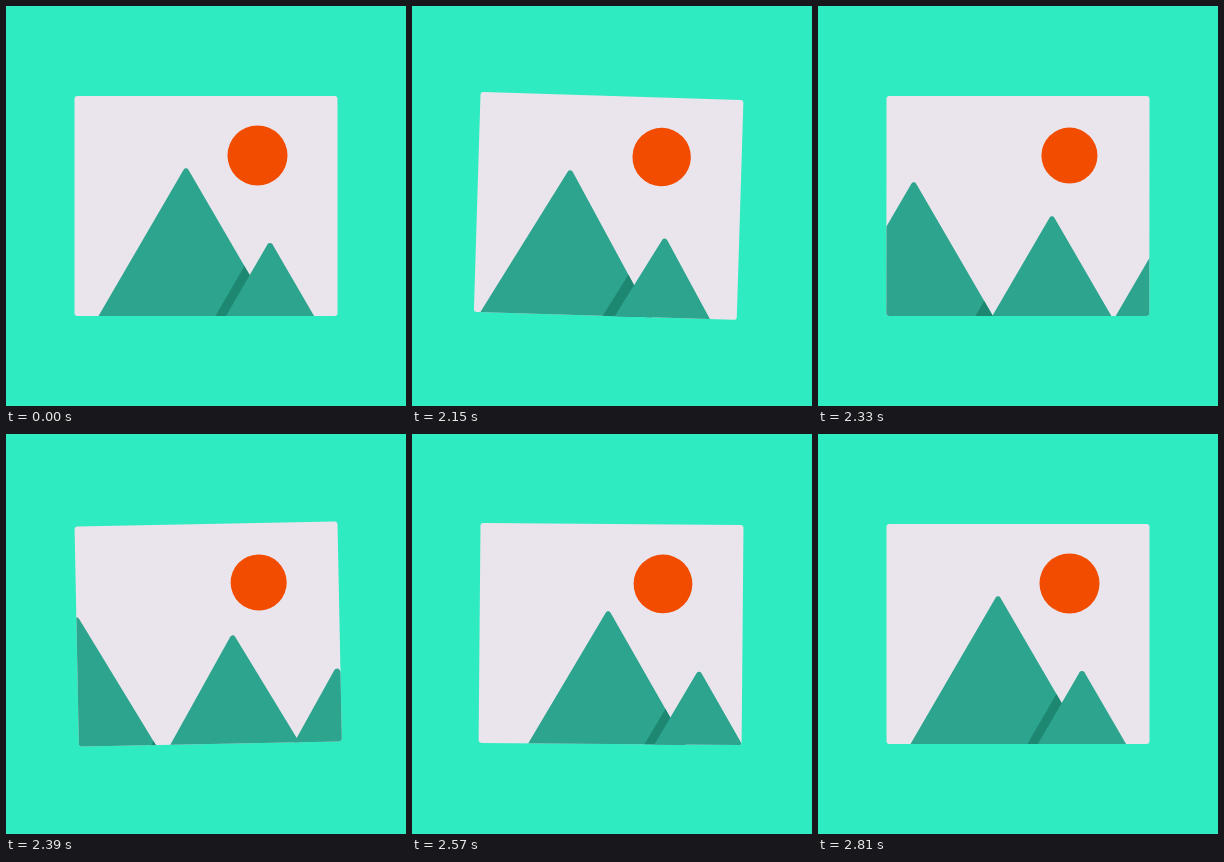
An HTML page with a canvas that plays this animation: 400x400 px, repeating every 2900 ms.

```html
<!DOCTYPE html>
<html>
<head>
<meta charset="utf-8">
<style>
html, body { margin: 0; height: 100%; overflow: hidden; background: #2febc1; }
canvas { display: block; }
</style>
</head>
<body>
<canvas id="stage" width="400" height="400"></canvas>
<script>
const ctx = document.getElementById('stage').getContext('2d');
const LOOP = 2900, REST = 2000, MOVE = 810, STEP = 30;
const BASE = 310, SLOPE = 1.72, TIP = 2.8;
const GREEN = '#2ca48e', SHADE = '#1e8772';

// Card tilt in degrees: [ms, angle]
const swing = [[0, 0], [195, 2], [230, 2], [405, -1.2], [600, 0.6], [800, 0]];

const clamp = (x, lo, hi) => Math.min(hi, Math.max(lo, x));
const ease = x => (1 - Math.cos(Math.PI * clamp(x, 0, 1))) / 2;
const mix = (a, b, k) => a + (b - a) * k;

function tilt(u) {
  const i = swing.findIndex(key => key[0] > u);
  if (i < 0) return 0;
  const [t0, a0] = swing[i - 1], [t1, a1] = swing[i];
  return mix(a0, a1, ease((u - t0) / (t1 - t0)));
}

// Triangle with a rounded tip whose visible top is at (x, y)
function mountain({ x, y }, shift = 0) {
  const top = y - TIP, bottom = BASE + 20, half = (bottom - top) / SLOPE;
  const path = new Path2D();
  path.moveTo(x - half + shift, bottom);
  path.arcTo(x + shift, top, x + half + shift, bottom, TIP);
  path.lineTo(x + half + shift, bottom);
  path.closePath();
  return path;
}

function fill(path, color) {
  ctx.fillStyle = color;
  ctx.fill(path);
}

// Shadow cast by the front mountain, visible only on the back one
function shadow(front, back, width) {
  if (width <= 0) return;
  ctx.save();
  ctx.clip(mountain(back));
  fill(mountain(front, -width), SHADE);
  ctx.restore();
}

function draw(u) {
  const p = ease(u / MOVE);
  const left = { x: mix(180, -56, p), y: mix(162.3, 202, p) };
  const middle = { x: mix(264, 180, p), y: mix(237, 162.3, p) };
  const right = { x: mix(385, 264, p), y: 237 };

  ctx.fillStyle = '#2febc1';
  ctx.fillRect(0, 0, 400, 400);
  ctx.save();
  ctx.translate(200, 90);
  ctx.rotate(tilt(u) * Math.PI / 180);
  ctx.translate(-200, -90);

  const card = new Path2D();
  card.roundRect(68.5, 90, 263, 220, 3);
  fill(card, '#eae5ec');
  ctx.clip(card);

  const sun = new Path2D();
  sun.arc(251.5, 149.5, 30 - 2 * Math.sin(Math.PI * Math.min(u / 700, 1)) ** 2, 0, 7);
  fill(sun, '#f24c00');

  fill(mountain(left), GREEN);
  shadow(middle, left, 10.5 + 18 * p);
  fill(mountain(middle), GREEN);
  shadow(right, middle, clamp((p - 0.6) * 50, 0, 10.5));
  fill(mountain(right), GREEN);
  ctx.restore();
}

function tick() {
  const t = performance.now() % LOOP;
  draw(clamp(Math.floor((t - REST) / STEP) * STEP, 0, MOVE));
  requestAnimationFrame(tick);
}
tick();
</script>
</body>
</html>
```
